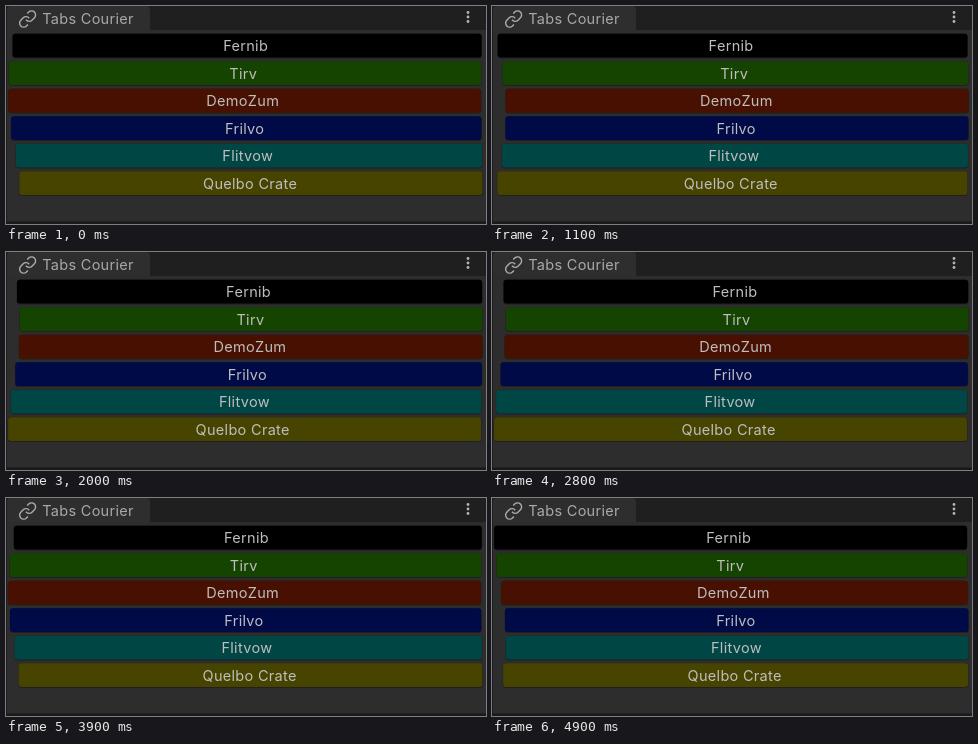
An HTML page that plays this animation: 480x218 px, repeating every 5000 ms.

```html
<!DOCTYPE html>
<html lang="en">
<head>
<meta charset="utf-8">
<title>Tabs Courier</title>
<style>
  html, body { margin: 0; width: 100%; height: 100%; overflow: hidden; background: #2d2d2d; }
  svg { display: block; width: 100vw; height: 100vh; }
  text { font: 400 14.5px Inter, "Open Sans", sans-serif; letter-spacing: 0.3px; }
  .label { fill: #bebebe; text-anchor: middle; }
</style>
</head>
<body>
<svg id="stage" viewBox="0 0 480 218">
  <rect width="480" height="218" fill="#2d2d2d"/>
  <rect width="480" height="24" fill="#1f1f1f"/>
  <path d="M1 24V4q0-4 4-4H140q4 0 4 4V24z" fill="#2e2e2e"/>
  <rect width="1" height="218" fill="#1c1c1c"/>
  <rect y="215.5" width="480" height="2.5" fill="#191919"/>

  <g transform="translate(21.6 13)" fill="none" stroke="#adadad" stroke-width="1.4">
    <path id="link" d="M-1.6 .8a4 4 0 0 0 6 .4l2.4-2.4a4 4 0 0 0-5.7-5.7l-1.4 1.4"/>
    <use href="#link" transform="rotate(180)"/>
  </g>
  <text x="36.2" y="18" fill="#a9a9a9">Tabs Courier</text>
  <g fill="#b4b4b4">
    <circle cx="462" cy="6.5" r="1.4"/>
    <circle cx="462" cy="11" r="1.4"/>
    <circle cx="462" cy="15.5" r="1.4"/>
  </g>
  <g id="rows"></g>
</svg>
<script>
const LOOP = 5000, STEP = 100;
const TOP = 27.8, PITCH = 27.5;
const SPEED = 8, DELAY = 0.1, PHASE = -4.48;

const links = [
  ["Fernib", "#000000"],
  ["Tirv", "#154400"],
  ["DemoZum", "#471000"],
  ["Frilvo", "#000a47"],
  ["Flitvow", "#004645"],
  ["Quelbo Crate", "#474400"]
];

function add(tag, attrs) {
  const node = document.createElementNS("http://www.w3.org/2000/svg", tag);
  for (const key in attrs) node.setAttribute(key, attrs[key]);
  return document.getElementById("rows").appendChild(node);
}

const rows = links.map(([name, fill], i) => {
  const y = TOP + i * PITCH;
  const shade = add("rect", { y: y - 0.3, height: 24.9, rx: 3.5, fill: "#202020" });
  const bar = add("rect", { y, height: 23.7, rx: 3, fill });
  const label = add("text", { y: y + 17.4, class: "label" });
  label.textContent = name;
  return { shade, bar, label };
});

function setSpan(rect, left, right) {
  rect.setAttribute("x", left);
  rect.setAttribute("width", right - left);
}

// Each row follows the same wave, a little ahead of the row above.
function draw(ms) {
  const t = Math.floor((ms % LOOP) / STEP) * STEP / 1000;
  rows.forEach(({ shade, bar, label }, i) => {
    const left = 8 + 6 * Math.cos(SPEED * (t + DELAY * i) + PHASE);
    const right = 474.8 + 0.12 * left;
    setSpan(shade, left - 0.4, right + 0.4);
    setSpan(bar, left, right);
    label.setAttribute("x", 235.3 + 0.66 * left);
  });
}

const start = performance.now();
function tick() {
  draw(performance.now() - start);
  requestAnimationFrame(tick);
}
tick();
</script>
</body>
</html>
```
